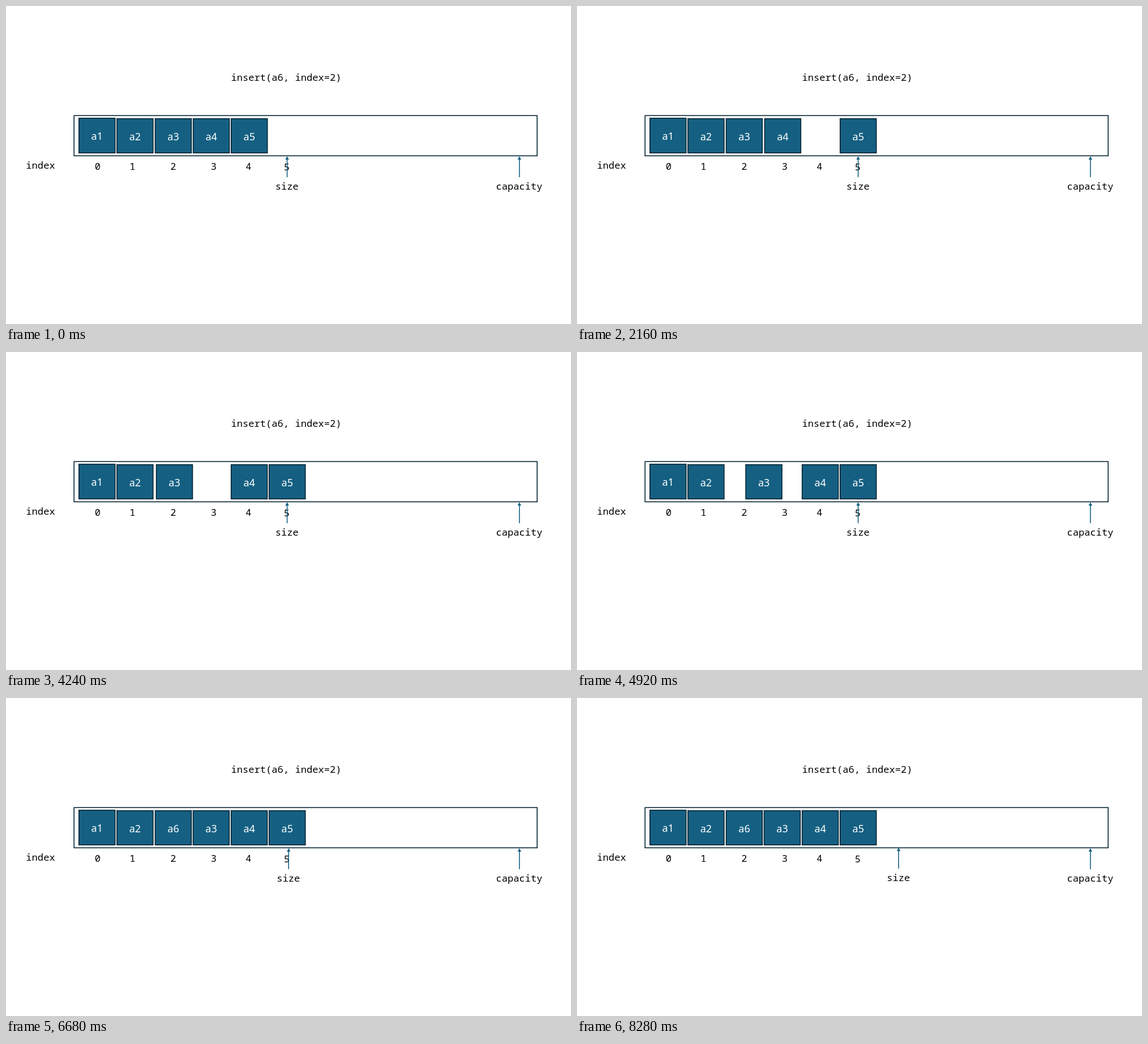
Animation of 998 by 561 pixels, one loop 8.36 s. Source, as an HTML page with a canvas:

```html
<!DOCTYPE html>
<html lang="en">
<head>
<meta charset="utf-8">
<title>Array insert</title>
<style>
  html, body { margin: 0; width: 100%; height: 100%; overflow: hidden; background: #fff; }
  canvas { display: block; width: 998px; height: 561px; }
</style>
</head>
<body>
<canvas id="stage" width="998" height="561"></canvas>
<script>
const ctx = document.getElementById('stage').getContext('2d');

const LOOP = 8360, TICK = 40, LAST = 8280;
const MOVE = 1770, STEP = 67;
const FILL = '#156082', EDGE = '#042433';
const MONO = '17.1px "Noto Sans Mono", "DejaVu Sans Mono", monospace';
const SANS = '18px "Noto Sans", "Open Sans", sans-serif';

const clamp = v => Math.min(1, Math.max(0, v));

// Constant acceleration to the middle, then constant braking.
function slide(t, start) {
  const p = clamp((t - start) / MOVE);
  return p < 0.5 ? 2 * p * p : 1 - 2 * (1 - p) * (1 - p);
}

function text(str, x, y, font = MONO, color = '#000') {
  ctx.font = font;
  ctx.fillStyle = color;
  ctx.fillText(str, x, y);
}

function box(label, x, top = 198.8) {
  const h = 259.2 - top;
  ctx.fillStyle = FILL;
  ctx.fillRect(x, top, 63.9, h);
  ctx.strokeStyle = EDGE;
  ctx.lineWidth = 1.6;
  ctx.strokeRect(x, top, 63.9, h);
  text(label, x + 32, top + 37.7, SANS, '#fff');
}

function pointer(label, x, dy = 0) {
  ctx.strokeStyle = ctx.fillStyle = FILL;
  ctx.lineWidth = 1.6;
  ctx.beginPath();
  ctx.moveTo(x, 302 + dy);
  ctx.lineTo(x, 269 + dy);
  ctx.stroke();
  ctx.beginPath();
  ctx.moveTo(x, 265 + dy);
  ctx.lineTo(x + 3.2, 271 + dy);
  ctx.lineTo(x - 3.2, 271 + dy);
  ctx.fill();
  text(label, x - 0.4, 324 + dy);
}

function draw(t) {
  ctx.fillStyle = '#fff';
  ctx.fillRect(0, 0, 998, 561);
  ctx.textAlign = 'center';

  text('insert(a6, index=2)', 495, 132);
  text('index', 61, 287);
  [162, 223.5, 295.5, 367, 428.5].forEach((x, i) => text(i, x, 289));
  text('5', 496, 290);

  ctx.strokeStyle = EDGE;
  ctx.lineWidth = 1.6;
  ctx.strokeRect(120.2, 193.3, 818, 71);

  box('a1', 128.8, 197.9);
  box('a2', 195.9);
  box('a3', 263.5 + STEP * slide(t, 4020));
  box('a4', 330.7 + STEP * slide(t, 2030));
  box('a5', 397.8 + STEP * slide(t, 75));

  ctx.globalAlpha = clamp((t - 5880) / 500);
  box('a6', 263.5);
  ctx.globalAlpha = 1;

  const k = slide(t, 6440);
  pointer('size', 496.6 + 71.5 * k, -k);
  pointer('capacity', 906.9);
}

function loop() {
  const t = performance.now() % LOOP;
  draw(t < 80 ? 0 : Math.min(LAST, Math.floor(t / TICK) * TICK));
  requestAnimationFrame(loop);
}
loop();
</script>
</body>
</html>
```
